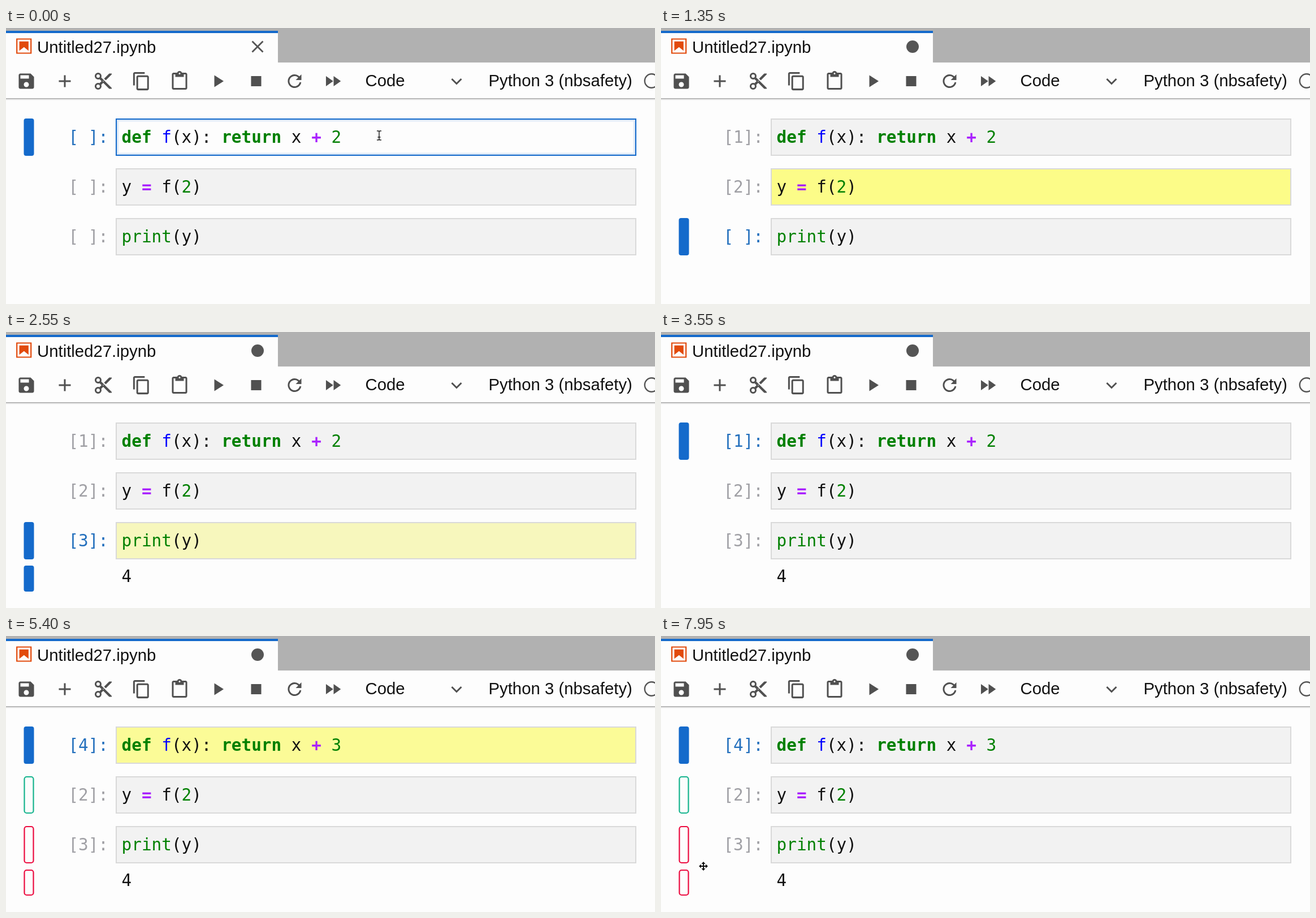
Animation, 1148 px wide and 488 px high, one loop 8000 ms. Source, as an HTML page with a canvas:

```html
<!DOCTYPE html>
<html lang="en">
<head>
<meta charset="utf-8">
<title>Notebook</title>
<style>
html, body { margin: 0; width: 100%; height: 100%; overflow: hidden; background: #fdfdfd; }
canvas { display: block; width: 1148px; height: 488px; }
</style>
</head>
<body>
<canvas id="stage" width="1148" height="488"></canvas>
<script>
const ctx = document.getElementById('stage').getContext('2d');
const LOOP = 8000;
const SIZE = 29.33;
const CHAR = 17.66;
const MONO = '"DejaVu Sans Mono", monospace';
const SANS = '"Liberation Sans", Arial, sans-serif';
const BLUE = '#146acb', GREEN = '#008000', INK = '#111', ICON = '#505050';

// Icon: centre x, grid size, path
const icons = [
  [36, 24, 'M17 3H5c-1.11 0-2 .9-2 2v14c0 1.1.89 2 2 2h14c1.1 0 2-.9 2-2V7l-4-4zm-5 16c-1.66 0-3-1.34-3-3s1.34-3 3-3 3 1.34 3 3-1.34 3-3 3zm3-10H5V5h10v4z'],
  [104, 24, 'M19 13h-6v6h-2v-6H5v-2h6V5h2v6h6z'],
  [172, 24, 'M9.64 7.64c.23-.5.36-1.05.36-1.64a4 4 0 1 0-4 4c.59 0 1.14-.13 1.64-.36L10 12l-2.36 2.36C7.14 14.13 6.59 14 6 14a4 4 0 1 0 4 4c0-.59-.13-1.14-.36-1.64L12 14l7 7h3v-1zM6 8a2 2 0 1 1 0-4 2 2 0 0 1 0 4zm0 12a2 2 0 1 1 0-4 2 2 0 0 1 0 4zm6-7.5a.5.5 0 1 1 0-1 .5.5 0 0 1 0 1zM19 3l-6 6 2 2 7-7V3z'],
  [239.5, 18, 'M11.9 1H3.2C2.4 1 1.7 1.7 1.7 2.5v10.2h1.5V2.5h8.7zM14.1 3.9h-8c-.8 0-1.5.7-1.5 1.5v10.2c0 .8.7 1.5 1.5 1.5h8c.8 0 1.5-.7 1.5-1.5V5.4c0-.8-.7-1.5-1.5-1.5zm0 11.6h-8V5.4h8z'],
  [307, 24, 'M19 2h-4.18C14.4.84 13.3 0 12 0S9.6.84 9.18 2H5c-1.1 0-2 .9-2 2v16c0 1.1.9 2 2 2h14c1.1 0 2-.9 2-2V4c0-1.1-.9-2-2-2zm-7 0a1 1 0 1 1 0 2 1 1 0 0 1 0-2zm7 18H5V4h2v3h10V4h2z'],
  [374.5, 24, 'M8 5v14l11-7z'],
  [442.5, 24, 'M6 6h12v12H6z'],
  [510.5, 18, 'M9 13.5a4.5 4.5 0 1 1 3.17-7.67L10 8h5V3l-1.76 1.76A6 6 0 1 0 14.9 10h-1.52c-.46 2-2.24 3.5-4.38 3.5z'],
  [578, 24, 'M4 18l8.5-6L4 6zm9-12v12l8.5-6z']
].map(([x, grid, d]) => ({ x, grid, path: new Path2D(d) }));
const bookFrame = new Path2D('M1.8 1.8h18.4v18.4H1.8zM3.3 3.3v15.4h15.4V3.3z');
const bookMark = new Path2D('M16.5 16.5l-5.4-4.3-5.6 4.3v-11h11z');

// Times of the user's actions
const RUN1 = 450, RUN2 = 1300, RUN3 = 2150, UP2 = 2900, UP1 = 3200;
const EDIT = 3900, ERASE = 4450, TYPE = 4750, RERUN = 5250;
const FADE = 750;

// Pointer path: time, x, y
const route = [
  [6150, 660, 190], [6600, 312, 259], [6950, 82, 285],
  [7350, 72, 370], [7700, 75, 407], [8000, 75, 407]
];

function rect(x, y, w, h, color) {
  ctx.fillStyle = color;
  ctx.fillRect(x, y, w, h);
}

function text(str, x, y, color, family = MONO, weight = '') {
  ctx.font = `${weight} ${SIZE}px ${family}`;
  ctx.fillStyle = color;
  ctx.fillText(str, x, y);
}

function line(points, color, width) {
  ctx.beginPath();
  points.forEach(([x, y]) => ctx.lineTo(x, y));
  ctx.strokeStyle = color;
  ctx.lineWidth = width;
  ctx.stroke();
}

function disc(x, y, r) {
  ctx.beginPath();
  ctx.arc(x, y, r, 0, Math.PI * 2);
}

function drawIcon(x, y, scale, grid, path, color) {
  ctx.save();
  ctx.translate(x, y);
  ctx.scale(scale, scale);
  ctx.translate(-grid / 2, -grid / 2);
  ctx.fillStyle = color;
  ctx.fill(path, 'evenodd');
  ctx.restore();
}

function header(dirty) {
  rect(0, 0, 1148, 61, '#b1b1b1');
  rect(0, 5, 481, 56, '#fdfdfd');
  rect(0, 5, 481, 4, BLUE);
  drawIcon(31.7, 32, 1.48, 22, bookFrame, '#e24a0c');
  drawIcon(31.7, 32, 1.48, 22, bookMark, '#e24a0c');
  text('Untitled27.ipynb', 55, 44, INK, SANS);
  if (dirty) {
    disc(445, 33, 11);
    ctx.fillStyle = '#555';
    ctx.fill();
  } else {
    line([[435.5, 23.5], [454.5, 42.5]], '#555', 2.8);
    line([[454.5, 23.5], [435.5, 42.5]], '#555', 2.8);
  }

  for (const { x, grid, path } of icons) drawIcon(x, 94, 36.1 / grid, grid, path, ICON);
  text('Code', 635.5, 103, INK, SANS);
  line([[788.5, 90], [797, 98.5], [805.5, 90]], ICON, 3);
  text('Python 3 (nbsafety)', 853.5, 103, INK, SANS);
  disc(1142, 93.5, 12.2);
  ctx.strokeStyle = '#555';
  ctx.lineWidth = 2.4;
  ctx.stroke();
  rect(0, 124, 1148, 2, '#b9b9b9');
  rect(0, 126, 1148, 2, '#f1f1f1');
}

function bar(y, h, color, hollow) {
  ctx.beginPath();
  if (hollow) {
    ctx.roundRect(32.5, y + 1, 16, h - 2, 4);
    ctx.strokeStyle = color;
    ctx.lineWidth = 2.2;
    ctx.stroke();
  } else {
    ctx.roundRect(31.5, y, 18, h, 4);
    ctx.fillStyle = color;
    ctx.fill();
  }
}

// Yellow flash that fades back to grey
function flash(age) {
  const k = age < 0 ? 1 : Math.min(1, Math.max(0, (age - 50) / (FADE - 50)));
  const mix = (a, b) => Math.round(a + (b - a) * k);
  const rg = mix(252, 242);
  return `rgb(${rg},${rg},${mix(136, 242)})`;
}

function cell(row, count, active, editing, age, parts) {
  const y = 160 + row * 88;
  if (active) bar(y, 66, BLUE);
  text(`[${count || ' '}]:`, 110.4, y + 43, active ? '#2470bd' : '#a0a0a5');
  rect(194, y, 921, 66, editing ? BLUE : '#d9d9d9');
  rect(196, y + 2, 917, 62, editing ? '#fdfdfd' : flash(age));
  if (editing) {
    for (let i = 0; i < 4; i++) {
      ctx.strokeStyle = `rgba(20,106,203,${0.2 - i * 0.05})`;
      ctx.lineWidth = 1;
      ctx.strokeRect(196.5 + i, y + 2.5 + i, 916 - 2 * i, 61 - 2 * i);
    }
  }
  for (const [col, str, color, weight] of parts) {
    text(str, 204.6 + col * CHAR, y + 43, color, MONO, weight);
  }
}

function beam(x, y) {
  const shape = [
    [[x - 4, y - 8], [x - 1, y - 8], [x, y - 7], [x + 1, y - 8], [x + 4, y - 8]],
    [[x, y - 7], [x, y + 7]],
    [[x - 4, y + 8], [x - 1, y + 8], [x, y + 7], [x + 1, y + 8], [x + 4, y + 8]],
    [[x - 2.5, y + 3], [x + 2.5, y + 3]]
  ];
  shape.forEach(p => line(p, '#fff', 3.2));
  shape.forEach(p => line(p, '#222', 1.5));
}

function moveCross(x, y) {
  for (const [color, width, grow] of [['#fff', 4.5, 1.5], ['#111', 2, 0]]) {
    line([[x - 6, y], [x + 6, y]], color, width);
    line([[x, y - 6], [x, y + 6]], color, width);
    for (let i = 0; i < 4; i++) {
      ctx.save();
      ctx.translate(x, y);
      ctx.rotate(i * Math.PI / 2);
      ctx.beginPath();
      ctx.moveTo(8 + grow, 0);
      ctx.lineTo(4 - grow / 2, -3.5 - grow);
      ctx.lineTo(4 - grow / 2, 3.5 + grow);
      ctx.fillStyle = color;
      ctx.fill();
      ctx.restore();
    }
  }
}

function pointer(t) {
  if (t < RUN1) return beam(660, 190);
  if (t < route[0][0]) return;
  const i = Math.max(1, route.findIndex(p => p[0] > t));
  const [t0, x0, y0] = route[i - 1];
  const [t1, x1, y1] = route[i];
  const k = (t - t0) / (t1 - t0);
  const x = x0 + (x1 - x0) * k, y = y0 + (y1 - y0) * k;
  (x > 194 ? beam : moveCross)(x, y);
}

function draw(t) {
  const active = t < RUN1 ? 0 : t < RUN2 ? 1 : t < UP2 ? 2 : t < UP1 ? 1 : 0;
  const editing = t < RUN1 || (t >= EDIT && t < RERUN);
  const stale = t >= RERUN;
  const digit = t < ERASE ? '2' : t < TYPE ? '' : '3';

  rect(0, 0, 1148, 488, '#fdfdfd');
  header(t >= RUN1);

  cell(0, stale ? 4 : t >= RUN1 ? 1 : 0, active === 0, editing, t - (stale ? RERUN : RUN1), [
    [0, 'def', GREEN, 'bold'], [4, 'f', '#0000ff'], [5, '(x):', INK],
    [10, 'return', GREEN, 'bold'], [17, 'x', INK], [19, '+', '#aa22ff', 'bold'],
    [21, digit, GREEN]
  ]);
  cell(1, t >= RUN2 ? 2 : 0, active === 1, false, t - RUN2, [
    [0, 'y', INK], [2, '=', '#aa22ff', 'bold'], [4, 'f(', INK], [6, '2', GREEN], [7, ')', INK]
  ]);
  cell(2, t >= RUN3 ? 3 : 0, active === 2, false, t - RUN3, [
    [0, 'print', GREEN], [5, '(y)', INK]
  ]);

  if (t >= RUN3) {
    text('4', 204.6, 442, INK);
    if (active === 2) bar(413, 46, BLUE);
  }
  if (stale) {
    bar(248, 66, '#16b48e', true);
    bar(336, 66, '#ec0c40', true);
    bar(413, 46, '#ec0c40', true);
  }
  if (t >= EDIT && t < RERUN) {
    const typed = t >= TYPE ? t - TYPE : t >= ERASE ? t - ERASE : t - EDIT;
    if (typed % 1060 < 530) rect(204.6 + (21 + digit.length) * CHAR, 176, 2, 34, INK);
  }
  pointer(t);
}

const start = performance.now();
function tick() {
  draw((performance.now() - start) % LOOP);
  requestAnimationFrame(tick);
}
tick();
</script>
</body>
</html>
```
